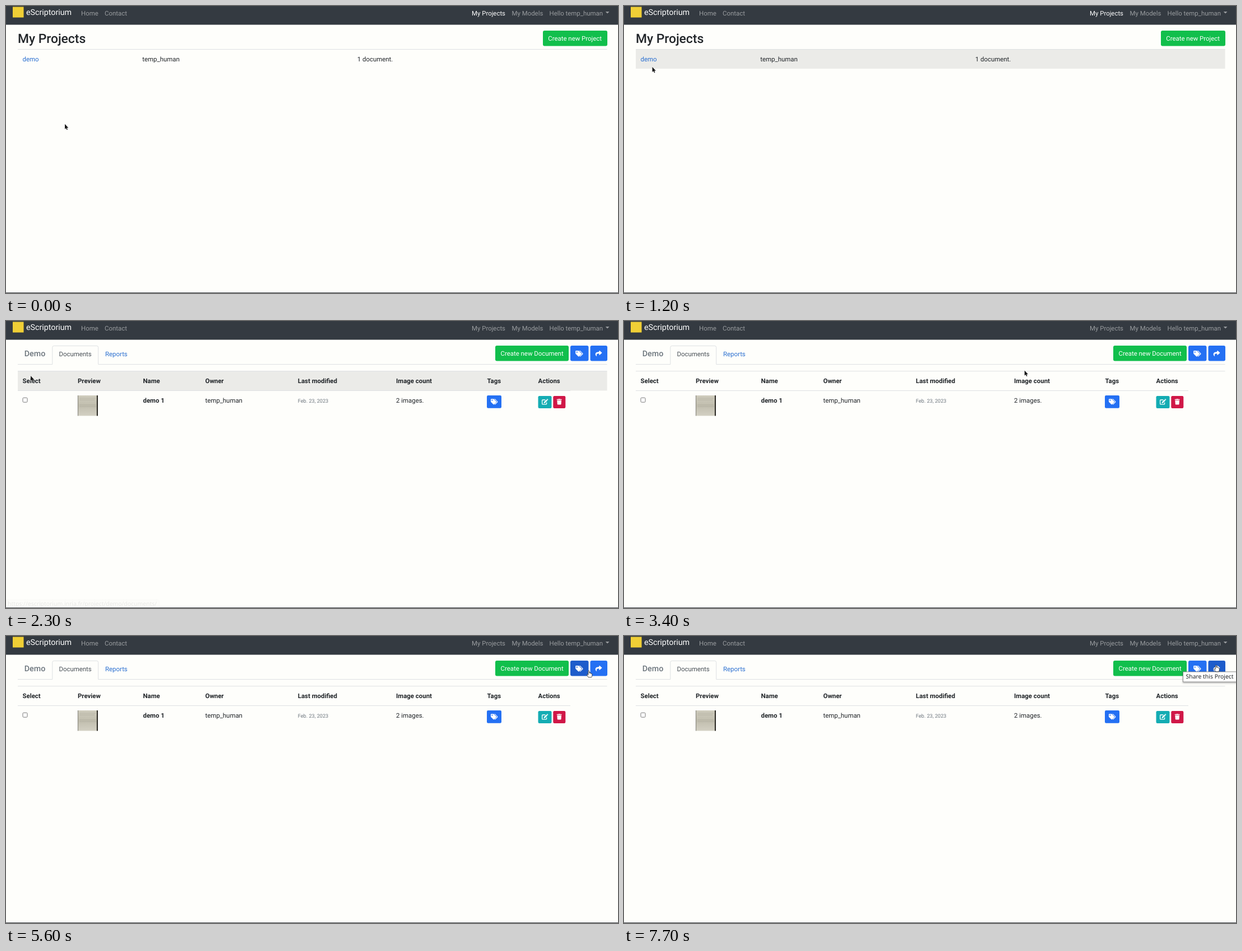
These frames come from a looping animation (1092x513 px, 8 s). An HTML page:

```html
<!DOCTYPE html>
<html lang="en">
<head>
<meta charset="utf-8">
<title>My Projects</title>
<style>
html, body { margin: 0; width: 100%; height: 100%; overflow: hidden; background: #fefefb; }
svg { display: block; font: 11.41px Roboto, sans-serif; fill: #212529; text-rendering: geometricPrecision; }
text { white-space: pre; }
.nav { fill: #999c9f; }
.white { fill: #fff; }
.grey { fill: #6c757d; }
.link { fill: #2a6fd0; }
.link.over { fill: #1b56ac; text-decoration: underline; }
.bold { font-weight: 700; }
.title { font-size: 22.8px; font-weight: 500; }
.brand { font-size: 14.26px; fill: #fff; }
.demo { font-size: 14.26px; font-weight: 500; }
.small { font-size: 9.13px; }
.tip { font: 10.4px "Noto Sans", sans-serif; }
.line { stroke: #dee1e3; fill: none; }
.row { fill: none; }
.row.over { fill: #ebebe8; }
.green { fill: #11bf4c; }
.blue { fill: #2470f3; }
.blue.over { fill: #1d5ccb; }
</style>
</head>
<body>
<svg id="stage" width="1092" height="513" viewBox="0 0 1092 513">
  <defs>
    <linearGradient id="paper" x2="0" y2="1">
      <stop offset="0" stop-color="#cfccbd"/>
      <stop offset=".5" stop-color="#c1beae"/>
      <stop offset="1" stop-color="#d3d0c3"/>
    </linearGradient>
    <filter id="shadow" x="-10%" y="-30%" width="120%" height="180%">
      <feDropShadow dx="0" dy="1.5" stdDeviation="1.5" flood-opacity=".35"/>
    </filter>
    <path id="share" d="M15.8 6.4 10.3 1.7C9.8 1.3 9 1.6 9 2.3V4.7C4 4.8 0 5.8 0 10.6c0 1.9 1.2 3.8 2.6 4.8.4.3 1-.1.8-.6C2 10.1 4.1 8.9 9 8.8v2.7c0 .7.8 1 1.3.6l5.5-4.7c.3-.3.3-.7 0-1Z"/>
    <path id="tags" fill-rule="evenodd" d="M0 7.9V2.5C0 1.7.7 1 1.5 1h5.4c.4 0 .8.2 1 .4l6.2 6.2c.6.6.6 1.5 0 2.1l-5.4 5.4c-.6.6-1.5.6-2.1 0L.4 8.9C.2 8.7 0 8.3 0 7.9ZM3.5 3a1.5 1.5 0 1 0 .01 0ZM8.8 1h1.6c.4 0 .8.2 1.1.4l6.1 6.2c.6.6.6 1.5 0 2.1l-5.4 5.4c-.6.6-1.5.6-2.1 0l-.1-.1 4.9-4.9c1.1-1.1 1.1-2.6 0-3.7Z"/>
    <g id="edit">
      <path d="M9.5 3H2.3Q1 3 1 4.3v9.4Q1 15 2.3 15h9.4Q13 15 13 13.7V10" fill="none" stroke="#fff" stroke-width="2"/>
      <path d="M6 8.8 12.5 2.3 15.2 5 8.7 11.5 5.5 12ZM13.2 1.6 14.2.6Q15 0 15.8.8L16.8 1.8Q17.5 2.5 16.9 3.3L15.9 4.3Z"/>
    </g>
    <path id="trash" d="M0 1.5Q0 1 .5 1H4L4.6.2Q4.8 0 5.2 0H8.8Q9.2 0 9.4.2L10 1h3.5Q14 1 14 1.5V3H0ZM1 4H13L12.3 14.6Q12.2 16 10.8 16H3.2Q1.8 16 1.7 14.6Z"/>
  </defs>

  <rect width="1092" height="33.5" fill="#343a41"/>
  <rect y="512" width="1092" height="1" fill="#45494c"/>
  <rect x="12" y="1.5" width="19.5" height="19" fill="#f0cf36"/>
  <text class="brand" x="36" y="16">eScriptorium</text>
  <g class="nav">
    <text x="134" y="16.7">Home</text>
    <text x="176" y="16.7">Contact</text>
    <text id="active" x="831" y="16.7">My Projects</text>
    <text x="902.5" y="16.7">My Models</text>
    <text x="969.5" y="16.7">Hello temp_human</text>
    <path d="M1069.7 10h6.8l-3.4 3.4Z"/>
  </g>

  <g id="list">
    <text class="title" x="21" y="66">My Projects</text>
    <rect class="green" x="958" y="44" width="115" height="27.5" rx="2.9"/>
    <text class="white" x="967.3" y="62.3">Create new Project</text>
    <rect id="project" class="row" x="21" y="77" width="1051.5" height="35"/>
    <path class="line" d="M21 77.5H1072.5"/>
    <text id="open" class="link" x="29.5" y="99.4">demo</text>
    <text x="243.3" y="99.4">temp_human</text>
    <text x="626.8" y="99.4">1 document.</text>
  </g>

  <g id="detail">
    <text class="demo grey" x="32.8" y="63.4">Demo</text>
    <path class="line" d="M21 77.5H82.8V47.2Q82.8 44.4 85.6 44.4H161.8Q164.6 44.4 164.6 47.2V77.5H1072.5"/>
    <text x="94.5" y="63.4" fill="#495057">Documents</text>
    <text class="link" x="177" y="63.4">Reports</text>
    <rect class="green" x="873" y="44" width="131" height="27.5" rx="2.9"/>
    <text class="white" x="882.5" y="62.3">Create new Document</text>
    <rect id="tagButton" class="blue" x="1007" y="44" width="32.5" height="27.5" rx="2.9"/>
    <rect id="shareButton" class="blue" x="1042.5" y="44" width="30.5" height="27.5" rx="2.9"/>
    <rect id="header" class="row" x="21" y="89" width="1051.5" height="35.5"/>
    <path class="line" d="M21 89.7H1072.5M21 124.5H1007"/>
    <g id="heads" class="bold"></g>
    <rect x="30" y="137.2" width="8" height="8" rx="1.5" fill="#fff" stroke="#777"/>
    <rect x="128" y="133" width="36" height="36.5" fill="url(#paper)"/>
    <path d="M131 138H160M131 141H158M131 150H160M131 153H161" stroke="#aaa797" stroke-width=".6"/>
    <path d="M128.4 133V169.5" stroke="#77756d" stroke-width=".9"/>
    <path d="M162.9 133V169.5" stroke="#26241f" stroke-width="2"/>
    <text class="bold" x="244.5" y="146.2">demo 1</text>
    <text x="355.5" y="146.2">temp_human</text>
    <text class="small grey" x="520.8" y="145.8">Feb. 23, 2023</text>
    <text x="696" y="146.2">2 images.</text>
    <rect class="blue" x="858" y="133" width="26" height="22.7" rx="2.2"/>
    <rect x="949.5" y="134" width="24" height="22" rx="2.2" fill="#14acb3"/>
    <rect x="976.3" y="134" width="22" height="22" rx="2.2" fill="#d01747"/>
    <g class="white">
      <use href="#tags" transform="translate(1016.2 52.2) scale(.74)"/>
      <use href="#share" transform="translate(1051.7 51.8) scale(.73)"/>
      <use href="#tags" transform="translate(865 138.5) scale(.69)"/>
      <use href="#edit" transform="translate(956 139) scale(.66)"/>
      <use href="#trash" transform="translate(982.7 139.2) scale(.64)"/>
    </g>
  </g>

  <g id="status">
    <path d="M0 498.5H271Q273.5 498.5 273.5 501V512H0Z" fill="#f3f3f0" stroke="#d5d5d2"/>
    <text class="tip" x="3" y="508.8" fill="#555">https://escriptorium.inria.fr/project/demo/documents/</text>
  </g>
  <g id="tooltip">
    <rect x="997.5" y="64" width="96" height="18" fill="#fff" stroke="#777" stroke-width=".8" filter="url(#shadow)"/>
    <text class="tip" x="1002.5" y="76.4">Share this Project</text>
  </g>

  <g id="pointer" stroke-linejoin="round">
    <path id="arrow" d="M0 0V9L2.1 7.2 3.5 10.4 4.9 9.8 3.5 6.7H6.3Z" fill="#161616" stroke="#fff" stroke-width=".8" paint-order="stroke"/>
    <path id="hand" d="M-1 1Q-1-.2 0-.2T1 1V4.2Q2-.2 3 4.6Q4.2 3.6 4.6 5.1Q6 4.4 6 6.1V8.2Q6 10 4.8 11.6H-.6Q-1.6 9.8-3.2 7.6Q-3.7 6.4-2.7 6.3Q-1.8 6.3-1 7.4Z" fill="#fff" stroke="#222" stroke-width=".8"/>
  </g>
</svg>
<script>
const LOOP = 8000, STEP = 100, OPENED = 2100;
const $ = id => document.getElementById(id);

// Pointer tip: time, x, y
const path = [
  [0, 105, 211], [700, 105, 211], [1000, 72, 150], [1200, 50.5, 109], [1400, 47, 101], [1600, 44, 98],
  [2400, 44, 98], [2500, 100, 102], [2700, 332, 105], [2900, 332, 105], [3000, 482, 99],
  [3200, 482, 99], [3400, 714.7, 88.5], [3500, 790, 77], [3700, 790, 77], [4000, 975, 73],
  [4200, 1044, 65], [4300, 1054.5, 61], [4600, 1056, 59], [4900, 1067, 42], [5200, 1058, 50],
  [5500, 1038, 59], [5600, 1039.8, 62.3], [5700, 1050, 68], [5900, 1066, 72.5], [6000, 1066, 72.5],
  [6200, 1077, 55], [6400, 1064, 35], [6500, 1064, 35], [6900, 1043, 47], [7200, 1054, 53],
  [7400, 1054, 53], [7500, 1056.3, 52.2], [LOOP, 1056.3, 52.2]
];

const heads = { Select: 29.5, Preview: 128, Name: 244.5, Owner: 355.5, "Last modified": 520.8,
  "Image count": 696, Tags: 858.5, Actions: 949.5 };
$("heads").innerHTML = Object.entries(heads)
  .map(([label, x]) => `<text x="${x}" y="111.2">${label}</text>`).join("");

function pointerAt(t) {
  const i = path.findIndex(p => p[0] > t);
  const [t0, x0, y0] = path[i - 1], [t1, x1, y1] = path[i];
  const k = (t - t0) / (t1 - t0);
  return [x0 + (x1 - x0) * k, y0 + (y1 - y0) * k];
}

const show = (id, on) => $(id).style.display = on ? "" : "none";

function statusOpacity(t) {
  if (t < 1700 || t >= 2500) return 0;
  if (t < 1800) return .5;
  if (t < OPENED) return 1;
  return Math.max(.12, .8 - (t - OPENED) / 290);
}

function draw(t) {
  const [x, y] = pointerAt(t), detail = t >= OPENED;
  const hover = (id, page, x0, y0, x1, y1) => {
    const over = page && x >= x0 && x <= x1 && y >= y0 && y <= y1;
    $(id).classList.toggle("over", over);
    return over;
  };
  hover("project", !detail, 21, 78, 1072, 112);
  hover("header", detail, 21, 90, 1072, 124);
  const links = [
    hover("open", !detail, 29, 88, 59, 102),
    hover("tagButton", detail, 1007, 44, 1040, 71.5),
    hover("shareButton", detail, 1042.5, 44, 1073, 71.5)
  ];
  const hand = links.includes(true);
  show("list", !detail);
  show("detail", detail);
  show("hand", hand);
  show("arrow", !hand);
  show("tooltip", t >= 7700);
  $("active").classList.toggle("white", !detail);
  $("status").style.opacity = statusOpacity(t);
  $("pointer").setAttribute("transform", `translate(${x} ${y})`);
}

const start = performance.now();
function tick(now) {
  const t = Math.max(0, now - start) % LOOP;
  draw(Math.floor(t / STEP) * STEP);
  requestAnimationFrame(tick);
}
draw(0);
requestAnimationFrame(tick);
</script>
</body>
</html>
```
